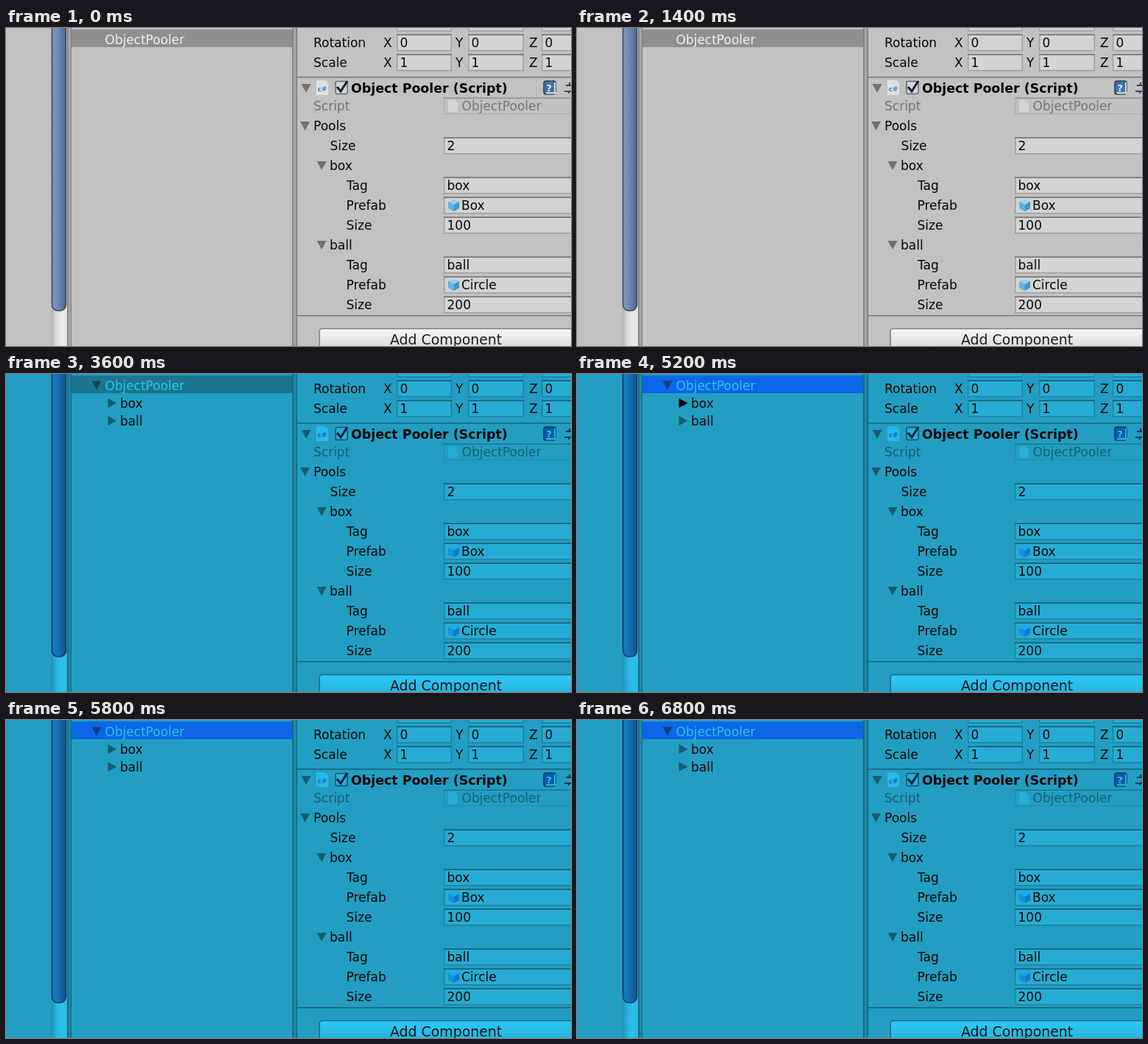
Animation, 768 px wide and 432 px high, one loop 7.9 s. Source, as an HTML page with a canvas:

```html
<!DOCTYPE html>
<html lang="en">
<head>
<meta charset="utf-8">
<title>Object pooler inspector</title>
<style>
html, body { margin: 0; width: 100%; height: 100%; overflow: hidden; background: #c2c2c2; }
canvas { display: block; filter: blur(0.4px); }
</style>
</head>
<body>
<canvas id="stage" width="768" height="432"></canvas>
<script>
const ctx = document.getElementById('stage').getContext('2d');
const LOOP = 7900;
const PANEL = '#c2c2c2', GAP = '#a5a5a5', EDGE = '#7d7d7d', FOLD = '#707070';
const FONT = '"DejaVu Sans", sans-serif';
const ROW = 24, FIRST_ROW = 16, FULL = 16;

function rect(x, y, w, h, color) {
  ctx.fillStyle = color;
  ctx.fillRect(x, y, w, h);
}

function text(str, x, middle, color = '#080808', font = '17px') {
  ctx.font = `${font} ${FONT}`;
  ctx.fillStyle = color;
  ctx.fillText(str, x, middle + 6);
}

function polygon(points, color) {
  ctx.fillStyle = color;
  ctx.beginPath();
  points.forEach(([x, y]) => ctx.lineTo(x, y));
  ctx.fill();
}

function arrow(x, y, down, color = FOLD) {
  polygon(down ? [[x - 6.5, y - 6], [x + 6.5, y - 6], [x, y + 6]]
               : [[x - 6, y - 6.5], [x + 6, y], [x - 6, y + 6.5]], color);
}

function horizontalGradient(x, w, ...colors) {
  const g = ctx.createLinearGradient(x, 0, x + w, 0);
  colors.forEach((c, i) => g.addColorStop(i / (colors.length - 1), c));
  return g;
}

function roundBox(x, y, w, h, radius, fill, stroke) {
  ctx.beginPath();
  ctx.roundRect(x, y, w, h, radius);
  ctx.fillStyle = fill;
  ctx.fill();
  ctx.strokeStyle = stroke;
  ctx.lineWidth = 1.5;
  ctx.stroke();
}

function scrollbar(x, thumbEnd) {
  rect(x, 0, 22, 432, horizontalGradient(x, 22, '#b0b0b0', '#dedede', '#ececec', '#e2e2e2'));
  roundBox(x + 1, -20, 19, thumbEnd + 20, 8,
    horizontalGradient(x, 21, '#7f97bc', '#7590b8', '#5f7aa5', '#47608a'), '#35445f');
}

function field(x, middle, w, value = '') {
  const y = middle - 11.5;
  rect(x, y, w, 23, '#a0a0a0');
  rect(x, y, w, 1.5, '#737373');
  rect(x + 1.5, y + 1.5, w - 3, 20, '#d3d3d3');
  text(value, x + 4.5, middle);
}

function cube(x, y) {
  polygon([[x, y - 8], [x + 7.5, y - 5], [x, y - 1], [x - 7.5, y - 5]], '#93cfee');
  polygon([[x - 7.5, y - 5], [x, y - 1], [x, y + 8], [x - 7.5, y + 4]], '#62b3e0');
  polygon([[x + 7.5, y - 5], [x, y - 1], [x, y + 8], [x + 7.5, y + 4]], '#4696c8');
}

function scriptIcon(x, y, w, h, alpha, label) {
  ctx.globalAlpha = alpha;
  polygon([[x, y], [x + w - 4, y], [x + w, y + 4], [x + w, y + h], [x, y + h]], '#dfe2e5');
  text(label, x + 1.5, y + h / 2 - 1, '#3f7fc0', 'bold 9px');
  ctx.globalAlpha = 1;
}

function helpBook() {
  roundBox(731, 72, 16, 18, 3, '#4470a5', '#24415f');
  rect(734, 87, 14, 2.5, '#cfd8e2');
  rect(745, 74, 2, 14, '#cfd8e2');
  text('?', 734.5, 80, '#e8f0f8', 'bold 13px');
}

function componentHeader() {
  rect(396, 66, 372, 1.5, '#777');
  arrow(408, 82, true);
  scriptIcon(422, 71, 16, 20, 1, 'c#');
  roundBox(448, 72.5, 16, 17, 2, '#d6d6d6', '#666');
  ctx.strokeStyle = '#10203c';
  ctx.lineWidth = 3;
  ctx.beginPath();
  ctx.moveTo(450, 80);
  ctx.lineTo(455, 86);
  ctx.lineTo(464, 72);
  ctx.stroke();
  text('Object Pooler (Script)', 469, 82, '#080808', 'bold 17.4px');

  helpBook();
  rect(761, 77, 7, 2, '#444');
  rect(759, 85, 9, 2, '#444');
  rect(765, 74, 2, 5, '#444');
  rect(764, 85, 2, 4, '#444');
}

function inspector() {
  rect(396, 0, 372, 432, PANEL);
  const axes = [['X', 513, 531, 75], ['Y', 611, 628, 76], ['Z', 711, 728, 60]];
  [['', -7, ''], ['Rotation', 20, '0'], ['Scale', 47, '1']].forEach(([label, y, value]) => {
    text(label, 418, y);
    axes.forEach(([axis, labelX, x, w]) => {
      if (label) text(axis, labelX, y);
      field(x, y, w, value);
    });
  });

  componentHeader();

  text('Script', 418, 106, '#737373');
  ctx.globalAlpha = 0.5;
  field(595, 106, 180);
  ctx.globalAlpha = 1;
  scriptIcon(601, 98, 13, 16, 0.6, '');
  text('ObjectPooler', 619.5, 106, '#777');

  arrow(406.5, 133, true);
  text('Pools', 418, 133);
  text('Size', 440.5, 160);
  field(595, 160, 180, '2');
  pool(187, 'box', 'Box', '100');
  pool(295, 'ball', 'Circle', '200');

  rect(396, 390, 372, 1.5, '#777');
  const shine = ctx.createLinearGradient(0, 408, 0, 440);
  shine.addColorStop(0, '#f8f8f8');
  shine.addColorStop(1, '#d4d4d4');
  roundBox(426, 408.5, 360, 32, 4, shine, '#7c7c7c');
  text('Add Component', 522, 423.5, '#1c1c1c', '18.9px');
}

function pool(y, tag, prefab, size) {
  arrow(429, y, true);
  text(tag, 440, y);
  text('Tag', 463, y + 27);
  field(595, y + 27, 180, tag);
  text('Prefab', 462.5, y + 54);
  field(595, y + 54, 180);
  cube(608.5, y + 54);
  text(prefab, 619, y + 54);
  text('Size', 462.5, y + 81);
  field(595, y + 81, 180, size);
}

function hierarchy({ focused, filled, boxes, balls, pressed }) {
  rect(89, 0, 300, 432, PANEL);
  rect(89, 2, 300, ROW, focused ? '#3e7de7' : '#8f8f8f');
  text('ObjectPooler', 134.5, FIRST_ROW, '#f0f0f0');
  if (!filled) return;

  arrow(123, FIRST_ROW - 0.5, true, focused ? '#254b8b' : '#585858');
  let y = FIRST_ROW;
  for (const [name, clone, count] of [['box', 'Box', boxes], ['ball', 'Circle', balls]]) {
    y += ROW;
    arrow(144.5, y - 0.5, count > 0, pressed === name ? '#000' : FOLD);
    text(name, 155, y);
    for (let i = 0; i < count; i++) {
      y += ROW;
      text(`${clone}(Clone)`, 178, y, '#707070');
    }
  }
  if (boxes === FULL) scrollbar(367, 120);
  if (balls === FULL) scrollbar(367, 70);
}

function stateAt(t) {
  const within = (from, to) => t >= from && t < to;
  const opened = (from, to, sliding) =>
    within(from, to) ? (sliding ? FULL / 2 : FULL) : 0;
  return {
    playing: t >= 1500,
    filled: t >= 3600,
    focused: within(700, 1400) || t >= 5200,
    boxes: opened(5300, 5800, t >= 5700),
    balls: opened(6300, 6800, t < 6400 || t >= 6700),
    pressed: within(5200, 5300) || within(5600, 5700) ? 'box'
      : within(6200, 6300) || within(6600, 6700) ? 'ball' : ''
  };
}

function draw(now) {
  const state = stateAt(now % LOOP);
  rect(0, 0, 768, 432, PANEL);
  scrollbar(61.5, 384);
  rect(84, 0, 5, 432, GAP);
  rect(83, 0, 1.5, 432, EDGE);
  rect(88, 0, 1.5, 432, EDGE);
  hierarchy(state);
  rect(389, 0, 7, 432, GAP);
  rect(389, 0, 1.5, 432, EDGE);
  rect(394.5, 0, 1.5, 432, EDGE);
  inspector();
  if (state.playing) {
    ctx.globalCompositeOperation = 'multiply';
    rect(0, 0, 768, 432, 'rgb(46, 208, 255)');
    ctx.globalCompositeOperation = 'source-over';
  }
  requestAnimationFrame(() => draw(performance.now() - start));
}

const start = performance.now();
draw(0);
</script>
</body>
</html>
```
